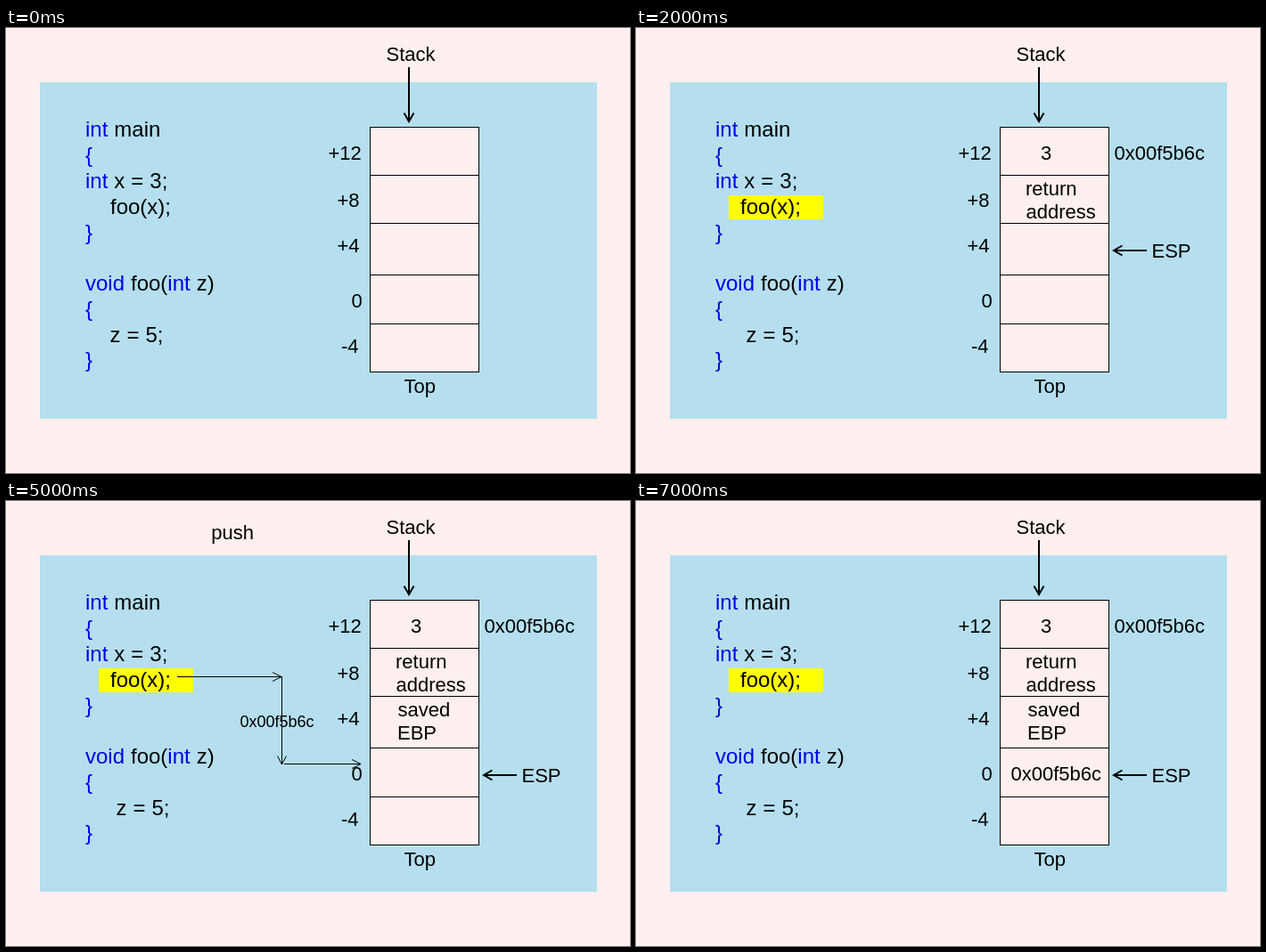
These frames come from a looping animation (700x500 px, 8 s). An HTML page:

```html
<!DOCTYPE html>
<html lang="en">
<head>
<meta charset="utf-8">
<title>Call stack</title>
<style>
html, body { margin: 0; height: 100%; overflow: hidden; background: #ffefee; }
svg { display: block; }
text { font: 22px "Liberation Sans", Arial, sans-serif; white-space: pre; }
.code text { font-size: 24px; word-spacing: .3px; }
.code text.kw, .kw { fill: #0000e6; }
.line { fill: none; stroke: #000; }
.bold { stroke-width: 2; }
#label { font-size: 18px; }
</style>
</head>
<body>
<svg width="700" height="500" viewBox="0 0 700 500">
  <rect x="38" y="61" width="625" height="378" fill="#b5dfee"/>
  <rect data-on="1 2" x="87" y="159" width="105" height="27" fill="#ff0"/>
  <rect data-on="2 8" x="104" y="188" width="106" height="27" fill="#ff0"/>

  <g class="code">
    <text x="89" y="122"><tspan class="kw">int</tspan> main</text>
    <text x="89" y="151" class="kw">{</text>
    <text x="89" y="180"><tspan class="kw">int</tspan> x = 3;</text>
    <text x="117" y="209">foo(x);</text>
    <text x="89" y="238" class="kw">}</text>
    <text x="89" y="295"><tspan class="kw">void</tspan> foo(<tspan class="kw">int</tspan> z)</text>
    <text x="89" y="324" class="kw">{</text>
    <text id="assign" y="353">z = 5;</text>
    <text x="89" y="381" class="kw">}</text>
  </g>

  <rect x="408.5" y="111.5" width="122" height="275" fill="#ffefee" stroke="#000"/>
  <path class="line" d="M408 165.5h122M408 219.5h122M408 277.5h122M408 332.5h122"/>
  <path class="line bold" d="M452 44V105M446.5 95.5L452 105L457.5 95.5"/>
  <text x="426.5" y="36.5">Stack</text>
  <text x="446.5" y="410">Top</text>
  <text x="361.5" y="147.5">+12</text>
  <text x="371.5" y="201">+8</text>
  <text x="371.5" y="252">+4</text>
  <text x="387.5" y="313.5">0</text>
  <text x="376" y="365">-4</text>

  <g data-on="1 8">
    <text x="454" y="147.5">3</text>
    <text x="536.5" y="147.5">0x00f5b6c</text>
    <g id="esp">
      <path class="line bold" d="M574 193H537M546.5 187.5L537 193L546.5 198.5"/>
      <text x="579.5" y="201">ESP</text>
    </g>
  </g>
  <g data-on="2 8">
    <text x="437" y="188">return</text>
    <text x="437.5" y="214">address</text>
  </g>
  <g data-on="3 8">
    <text x="439.5" y="242">saved</text>
    <text x="439" y="268">EBP</text>
  </g>
  <g data-on="4 7">
    <text x="230.3" y="43">push</text>
    <path class="line" d="M192 197.5H309M299 192.5L309 197.5L299 202.5
      M309.5 197V296M304.5 286.5L309.5 296L314.5 286.5
      M312 295.5H398M388 290.5L398 295.5L388 300.5"/>
    <text id="label">0x00f5b6c</text>
  </g>
  <text data-on="7 8" x="420.5" y="313.5">0x00f5b6c</text>
</svg>
<script>
const STEP = 1000, STEPS = 8;
const el = id => document.getElementById(id);
const move = (id, [x, y]) => el(id).setAttribute('transform', `translate(${x} ${y})`);
const pick = (list, i) => list[Math.max(0, Math.min(i, list.length - 1))];

const parts = [...document.querySelectorAll('[data-on]')].map(node => {
  const [from, to] = node.dataset.on.split(' ').map(Number);
  return { node, from, to };
});
const espStops = [[0, 0], [-1, 57], [-1, 115]];
const labelStops = [[212.5, 189], [262.5, 254], [311.5, 287]];

function draw(now) {
  const step = Math.floor(now / STEP) % STEPS;
  for (const { node, from, to } of parts)
    node.style.display = step >= from && step < to ? '' : 'none';
  el('assign').setAttribute('x', step ? 123.5 : 116.5);
  move('esp', pick(espStops, step - 1));
  move('label', pick(labelStops, step - 4));
}

let start;
function tick(now) {
  start ??= now;
  draw(now - start);
  requestAnimationFrame(tick);
}
draw(0);
requestAnimationFrame(tick);
</script>
</body>
</html>
```
